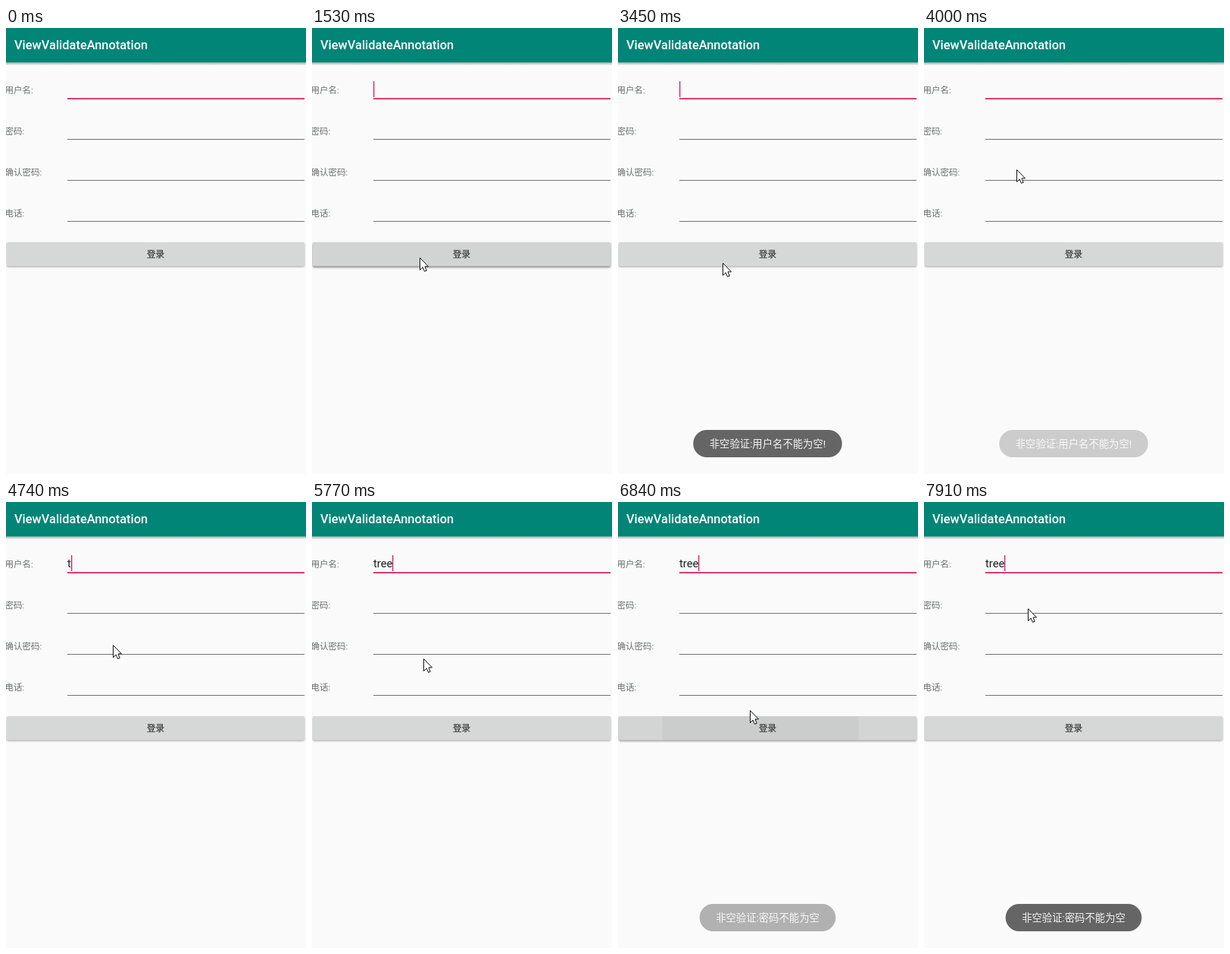
An HTML page for the animation above (8000 ms loop, 396 px wide and 587 px high).

```html
<!DOCTYPE html>
<html lang="zh-CN">
<head>
<meta charset="utf-8">
<title>ViewValidateAnnotation</title>
<style>
  html, body { margin: 0; width: 100%; height: 100%; overflow: hidden; background: #fafafa; }
  svg { display: block; width: 396px; height: 587px; }
  text { font-family: Roboto, "Noto Sans CJK SC", "Noto Sans CJK", sans-serif; white-space: pre; }
  .title { font-size: 16.4px; font-weight: 500; fill: #fff; }
  .label { font-size: 11.5px; fill: #6b706e; }
  .button { font-size: 11.5px; font-weight: 500; text-anchor: middle; fill: #3c4240; stroke: #3c4240; stroke-width: .25; }
  .entry { font-size: 14.8px; fill: #1f1f1f; }
  .toast { font-size: 13.35px; text-anchor: middle; fill: #f4f4f4; }
</style>
</head>
<body>
<svg viewBox="0 0 396 587">
  <defs>
    <linearGradient id="barShade" x1="0" y1="0" x2="0" y2="1">
      <stop offset="0" stop-color="#000" stop-opacity=".3"/>
      <stop offset="1" stop-color="#000" stop-opacity="0"/>
    </linearGradient>
    <filter id="soft" x="-5%" y="-30%" width="110%" height="160%">
      <feGaussianBlur stdDeviation="1.2"/>
    </filter>
    <clipPath id="buttonClip"><rect x="1" y="282" width="393" height="31.5" rx="2"/></clipPath>
  </defs>

  <rect width="396" height="587" fill="#fafafa"/>
  <rect width="396" height="45.4" fill="#008577"/>
  <rect y="45.4" width="396" height="4" fill="url(#barShade)"/>
  <text class="title" x="11" y="28.3">ViewValidateAnnotation</text>

  <g id="fields"></g>
  <text class="entry" id="entry" x="81" y="86"></text>
  <rect id="caret" y="70" width="1.3" height="21" fill="#d81b60"/>

  <rect x="1" y="283" width="393" height="31.5" rx="2" opacity=".35" filter="url(#soft)"/>
  <rect id="lift" x="1" y="284" width="393" height="32" rx="2" opacity="0" filter="url(#soft)"/>
  <rect x="1" y="282" width="393" height="31.5" rx="2" fill="#d6d8d7"/>
  <g clip-path="url(#buttonClip)">
    <rect id="tint" y="282" width="396" height="32" opacity="0"/>
    <circle id="ripple" opacity="0"/>
  </g>
  <text class="button" x="197.5" y="302.3">登录</text>

  <g id="toast" opacity="0">
    <rect id="pill" y="529" height="36" rx="18" fill="#656565"/>
    <text class="toast" id="message" x="197.5" y="552"></text>
  </g>

  <path id="mouse" d="M.5 .5V16.5L4.2 13L6.5 18.3L9.2 17.3L7 11.9H11.5Z"
        fill="#fff" stroke="#111" stroke-linejoin="round"/>
</svg>
<script>
const LOOP = 8000;
const BLINK = 512;
const CENTER = { x: 197.5, y: 298 };

// pointer strokes: each eases from the previous end point
const ENTRY = { x: 292, y: 572 };
const strokes = [
  { from: 40, to: 730, x: 142, y: 302 },
  { from: 2200, to: 3300, x: 138, y: 309 },
  { from: 3450, to: 4000, x: 122, y: 186 },
  { from: 4230, to: 4740, x: 141, y: 188 },
  { from: 5600, to: 6280, x: 179, y: 300 },
  { from: 6720, to: 7200, x: 146, y: 139 },
  { from: 7300, to: 7890, x: 137, y: 140 }
];
const taps = [
  { down: 1530, up: 1585, text: "非空验证:用户名不能为空!" },
  { down: 6460, up: 6700, text: "非空验证:密码不能为空" }
];
const typing = { word: "tree", start: 4610, step: 330 };

const $ = id => document.getElementById(id);
const set = (id, attrs) => { for (const k in attrs) $(id).setAttribute(k, attrs[k]); };
const write = (id, text) => { if ($(id).textContent !== text) $(id).textContent = text; };
const clamp = v => Math.min(1, Math.max(0, v));
const mix = (a, b, p) => a + (b - a) * p;
const smooth = p => p * p * (3 - 2 * p);

$("fields").innerHTML = ["用户名:", "密码:", "确认密码:", "电话:"].map((name, i) => {
  const look = i ? 'height="1" fill="#747474"' : 'height="1.7" fill="#d81b60"';
  return `<text class="label" x="-1.5" y="${86.3 + i * 54}">${name}</text>
    <rect x="81" y="${(i ? 92 : 92.2) + i * 54}" width="313" ${look}/>`;
}).join("");

function pointerAt(t) {
  return strokes.reduce((pos, s) => {
    const p = smooth(clamp((t - s.from) / (s.to - s.from)));
    return { x: mix(pos.x, s.x, p), y: mix(pos.y, s.y, p) };
  }, ENTRY);
}

function drawPointer(t) {
  const { x, y } = pointerAt(t);
  set("mouse", {
    visibility: t < strokes[0].from ? "hidden" : "visible",
    transform: `translate(${Math.round(x)} ${Math.round(y)})`
  });
}

// the caret blinks evenly; every key press restarts the blink
function drawEntry(t) {
  const { word, start, step } = typing;
  const count = Math.min(word.length, Math.max(0, Math.floor((t - start) / step) + 1));
  const origin = count ? start + (count - 1) * step : 42;
  write("entry", word.slice(0, count));
  const end = count ? $("entry").getComputedTextLength() : 0;
  set("caret", {
    x: 81 + Math.round(end),
    visibility: Math.floor((t - origin) / BLINK) % 2 ? "hidden" : "visible"
  });
}

function drawButton(t) {
  const tap = taps.find(p => t >= p.down && t < p.up + 500);
  if (!tap) return ["lift", "tint", "ripple"].forEach(id => set(id, { opacity: 0 }));
  const after = t - tap.up;
  const fade = 1 - clamp(after / 400);
  const grow = smooth(clamp(after / 300));
  const held = Math.min(t, tap.up) - tap.down;
  const tip = pointerAt(tap.down);
  set("lift", { opacity: 0.2 * (1 - clamp(after / 250)) });
  set("tint", { opacity: 0.02 * fade });
  set("ripple", {
    cx: mix(tip.x + 1, CENTER.x, grow),
    cy: mix(tip.y, CENTER.y, grow),
    r: mix(held * 0.28, 205, grow),
    opacity: 0.06 * fade
  });
}

function drawToast(t) {
  const tap = taps.find(p => t >= p.up && t < p.up + 2500);
  if (!tap) return set("toast", { opacity: 0 });
  const age = t - tap.up;
  const enter = 1 - (1 - clamp(age / 500)) ** 2;
  const leave = 1 - clamp((age - 2000) / 500) ** 2;
  write("message", tap.text);
  const width = $("message").getComputedTextLength() + 43;
  set("pill", { x: CENTER.x - width / 2, width });
  set("toast", { opacity: enter * leave });
}

const begin = performance.now();
function frame() {
  const t = (performance.now() - begin) % LOOP;
  for (const draw of [drawPointer, drawEntry, drawButton, drawToast]) draw(t);
  requestAnimationFrame(frame);
}
frame();
</script>
</body>
</html>
```
